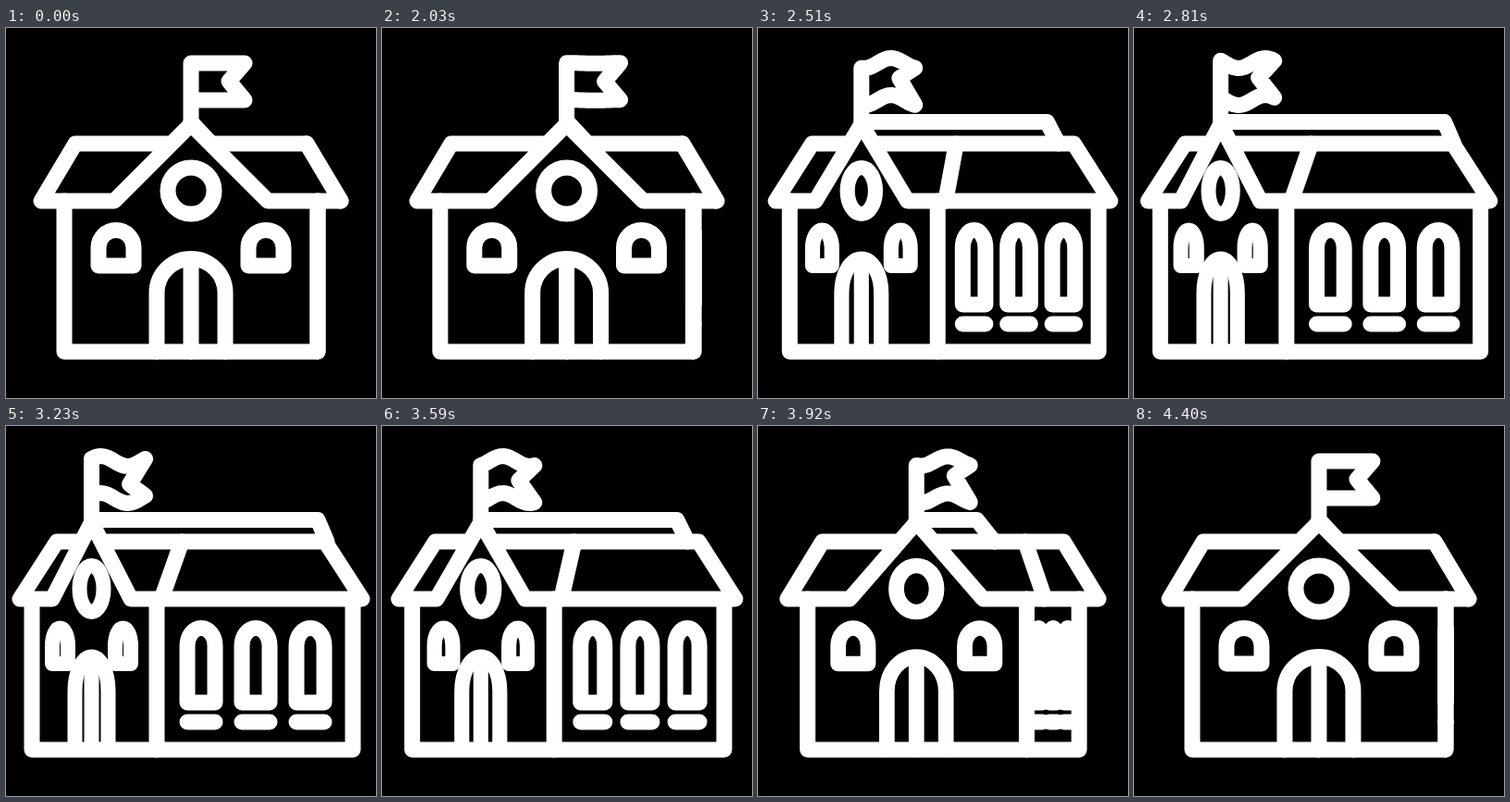
Recreate the animation shown at these times as an HTML page with a canvas. Size 400 px wide and 400 px high, loop 4.43 s.

```html
<!DOCTYPE html>
<html lang="en">
<head>
<meta charset="utf-8">
<title>Turning schoolhouse</title>
<style>
  html, body { margin: 0; width: 100%; height: 100%; overflow: hidden; background: #000; }
  canvas { display: block; width: 400px; height: 400px; }
</style>
</head>
<body>
<canvas id="stage" width="400" height="400"></canvas>
<script>
const ctx = document.getElementById('stage').getContext('2d');
const LOOP = 4430;
const EAVE = 187, ROOF = 125, APEX = 104, RIDGE = 101.5, GROUND = 350;

const mix = (a, b, k) => a + (b - a) * k;
const clamp = v => Math.min(1, Math.max(0, v));
const span = (t, from, to) => clamp((t - from) / (to - from));

// Cubic easing with handles at (x1, 0) and (x2, 1), solved by bisection.
function ease(x, x1, x2) {
  if (x <= 0 || x >= 1) return clamp(x);
  let lo = 0, hi = 1, s = 0.5;
  for (let i = 0; i < 24; i++) {
    s = (lo + hi) / 2;
    const at = 3 * (1 - s) ** 2 * s * x1 + 3 * (1 - s) * s * s * x2 + s ** 3;
    if (at < x) lo = s; else hi = s;
  }
  return s * s * (3 - 2 * s);
}

// 0 = seen from the front, 1 = turned to show the side.
const turnAt = t => t < 3200
  ? ease(span(t, 2000, 2930), 0.33, 0.25)
  : 1 - ease(span(t, 3400, 4430), 0.33, 0.32);

function line(...points) {
  ctx.beginPath();
  points.forEach(([x, y]) => ctx.lineTo(x, y));
  ctx.stroke();
}

function arch(x, halfWidth, top, bottom, rise, closed) {
  ctx.beginPath();
  ctx.moveTo(x - halfWidth, bottom);
  ctx.lineTo(x - halfWidth, top + rise);
  ctx.ellipse(x, top + rise, halfWidth, rise, 0, Math.PI, 2 * Math.PI);
  ctx.lineTo(x + halfWidth, bottom);
  if (closed) ctx.closePath();
  ctx.stroke();
}

// A single wave crest runs along the cloth and slows down over time.
function drawFlag(x, t) {
  const s = (t - 2510) / 1000;
  const crest = 0.55 + s - 0.19 * s * s;
  const size = 5.5 * span(t, 2010, 2330) * (1 - span(t, 3900, 4190));
  const wave = u => -size * Math.cos(2 * Math.PI * (u - crest));
  const edge = y => Array.from({ length: 17 }, (_, i) => [x + 58 * i / 16, y + wave(i / 16)]);
  line([x, APEX], ...edge(38), [x + 41, 57.5 + wave(0.7)], ...edge(78).reverse());
}

function drawFront(p, x) {
  ctx.lineWidth = mix(17, 16, p);
  ctx.beginPath();
  ctx.ellipse(x, 176, mix(25, 13, p), 25, 0, 0, 2 * Math.PI);
  ctx.stroke();
  for (const side of [-1, 1])
    arch(x + side * mix(81, 34, p), mix(19, 8.5, p), 218.5, 257, 19, true);
  arch(x, mix(37, 18, p), 249.5, GROUND, 37, false);
  line([x, 252], [x, GROUND]);
  ctx.lineWidth = 17;
}

function drawSide(p) {
  const middle = mix(337, 270, p), half = 15 * p;
  for (const i of [-1, 0, 1]) {
    const x = middle + i * 59 * p;
    arch(x, half, 218.5, 299, 19, true);
    line([x - half, 320], [x + half, 320]);
  }
}

function drawHouse(p, x) {
  const left = mix(63, 28, p), right = mix(337, 375, p), corner = mix(337, 163, p);
  const footL = mix(117, 50, p), footR = mix(283, 135, p);
  const roofL = mix(75, 55, p), roofR = mix(325, 345, p);
  const eaveL = mix(38, 15, p), eaveR = mix(362, 385, p);
  const ridgeEnd = mix(200, 337, p);
  const k = (ROOF - APEX) / (EAVE - APEX);

  line([left, EAVE], [left, GROUND], [right, GROUND], [right, EAVE]);
  line([corner, EAVE], [corner, GROUND]);
  line([mix(x, footL, k), ROOF], [roofL, ROOF], [eaveL, EAVE],
       [footL, EAVE], [x, APEX], [footR, EAVE], [eaveR, EAVE],
       [roofR, ROOF], [mix(x, footR, k), ROOF]);
  line([mix(325, 190, p), ROOF], [mix(362, 168, p), EAVE]);
  line([x, RIDGE], [ridgeEnd, RIDGE], [ridgeEnd + mix(22, 10, p), ROOF]);
}

function frame(now) {
  const t = now % LOOP;
  const p = turnAt(t), x = mix(200, 92.5, p);
  ctx.fillStyle = '#000';
  ctx.fillRect(0, 0, 400, 400);
  ctx.strokeStyle = '#fff';
  ctx.lineWidth = 17;
  ctx.lineCap = ctx.lineJoin = 'round';
  drawHouse(p, x);
  if (p > 0) drawSide(p);
  drawFront(p, x);
  drawFlag(x, t);
  requestAnimationFrame(frame);
}

requestAnimationFrame(frame);
</script>
</body>
</html>
```
